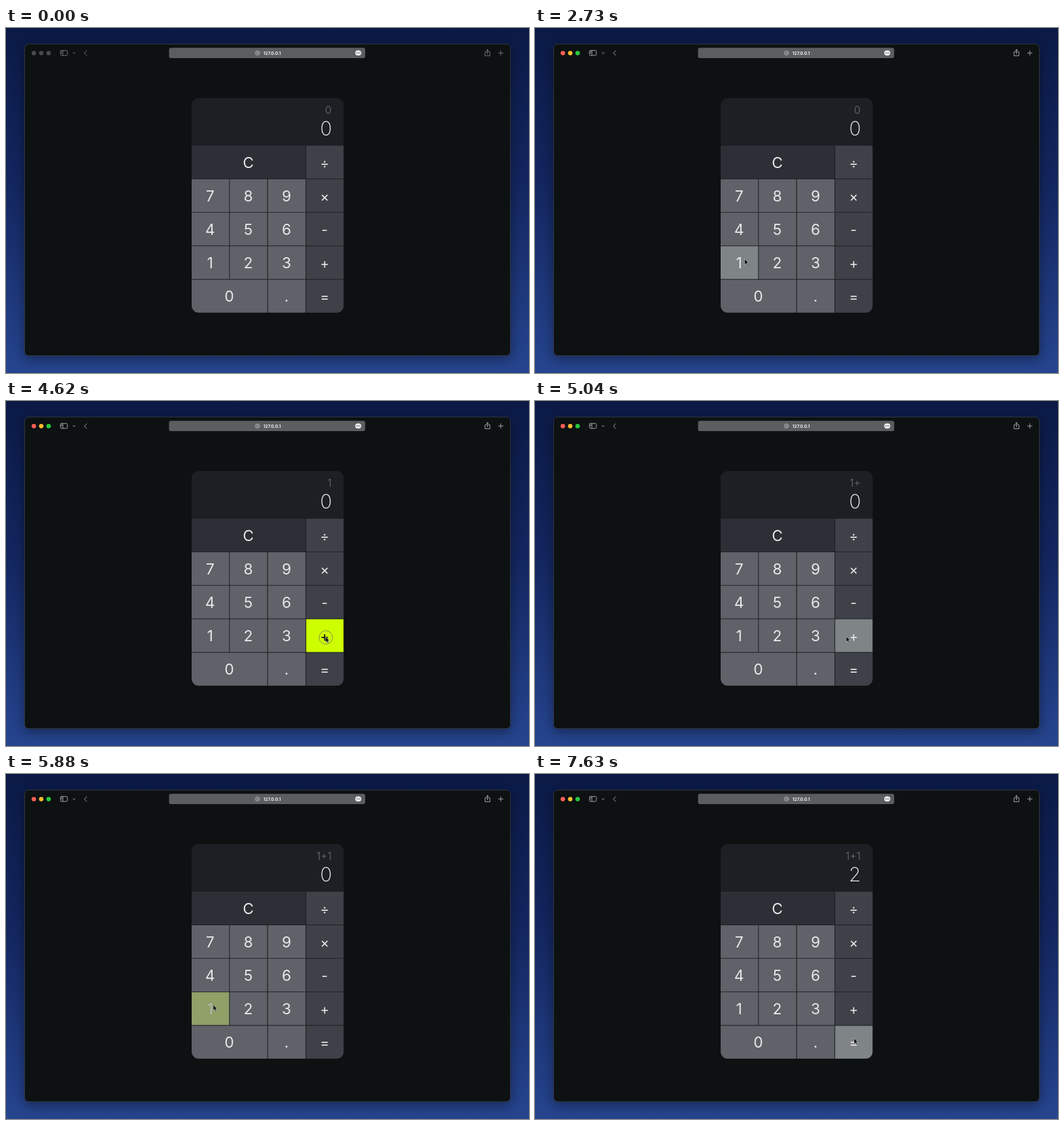
Write an HTML page that moves like this. It is 800x527 px and loops after 8 s.

```html
<!DOCTYPE html>
<html lang="en">
<head>
<meta charset="utf-8">
<title>Calculator</title>
<style>
  html, body { margin: 0; width: 100%; height: 100%; overflow: hidden; background: #10215a; }
  svg { display: block; width: 100vw; height: 100vh; }
  text { font-family: Inter, "Liberation Sans", sans-serif; }
  .key text { font-size: 23px; text-anchor: middle; }
  .key .op { font-size: 21px; }
  .icon { fill: none; stroke-width: 1; stroke-linecap: round; stroke-linejoin: round; }
</style>
</head>
<body>
<svg viewBox="0 0 800 527" preserveAspectRatio="none">
  <defs>
    <linearGradient id="sky" x2="0" y2="1">
      <stop offset="0" stop-color="#0b1a45"/>
      <stop offset=".45" stop-color="#13265f"/>
      <stop offset="1" stop-color="#26458f"/>
    </linearGradient>
    <filter id="blur" x="-10%" y="-10%" width="120%" height="120%">
      <feGaussianBlur stdDeviation="9"/>
    </filter>
    <clipPath id="body"><rect x="284" y="107" width="232.6" height="328" rx="11"/></clipPath>
  </defs>

  <rect width="800" height="527" fill="url(#sky)"/>
  <rect x="28" y="30" width="744" height="476" rx="8" opacity=".38" filter="url(#blur)"/>
  <rect x="28.5" y="24.5" width="743" height="476" rx="6" fill="#0d1112" stroke="#3b4044" stroke-width=".8"/>

  <g id="lights">
    <circle cx="42.6" cy="38.3" r="3.4"/>
    <circle cx="53.9" cy="38.3" r="3.4"/>
    <circle cx="65.2" cy="38.3" r="3.4"/>
  </g>
  <g id="tools" class="icon">
    <rect x="83.3" y="34.3" width="10.6" height="7.6" rx="1.4"/>
    <path d="M87 34.5V41.8M84.7 36.3h.9M84.7 38h.9"/>
    <path d="M102.6 37.7L104.2 39.2L105.8 37.7"/>
    <path d="M123.4 34.8L119.8 38.3L123.4 41.8"/>
    <path d="M735 36.4H732.8V42.4H740.2V36.4H738M736.5 39.5V33M734.6 34.7L736.5 32.9L738.4 34.7"/>
    <path d="M753.4 38.2H760.4M756.9 34.7V41.7"/>
  </g>
  <rect x="249.4" y="30.3" width="300" height="15.8" rx="3" fill="#5b5d5f"/>
  <g class="icon" stroke="#a8aaab" style="stroke-width:.6">
    <circle cx="384.6" cy="38.2" r="3.5"/>
    <ellipse cx="384.6" cy="38.2" rx="1.6" ry="3.5"/>
    <path d="M381.1 38.2H388.1M381.7 36.4H387.5M381.7 40H387.5"/>
  </g>
  <text x="407" y="40.8" font-size="6.7" font-weight="600" text-anchor="middle" fill="#fff">127.0.0.1</text>
  <rect x="534.2" y="34.2" width="9.2" height="7.8" rx="3.9" fill="#f2f2f2"/>
  <g fill="#55575a">
    <circle cx="536.6" cy="38.1" r=".8"/><circle cx="538.8" cy="38.1" r=".8"/><circle cx="541" cy="38.1" r=".8"/>
  </g>

  <g clip-path="url(#body)">
    <rect x="284" y="107" width="233" height="328" fill="#1d1f24"/>
    <g id="keys"></g>
  </g>
  <text id="sum" x="498" y="131.2" font-size="16" font-weight="300" text-anchor="end" fill="#6d6f73"></text>
  <text id="result" x="498.5" y="164" font-size="30" font-weight="200" text-anchor="end" fill="#f2f2f3"></text>

  <circle id="ring" r="10.3" fill="none" stroke="#70765f" stroke-width="1"/>
  <path id="arrow" d="M0 0V8.6L2 6.9L3.3 9.8L4.8 9.1L3.5 6.3H6.1Z"
    fill="#050505" stroke="#d8d8d8" stroke-width=".6" stroke-linejoin="round"/>
</svg>
<script>
const LOOP = 8000, STEP = 70, FADE = 260, HOLD = 150;
const COLS = [284, 342.3, 400.8, 459.2], ROWS = [179.8, 231, 282.1, 333.3, 384.6];
const LIGHT = [231, 232, 233], BLACK = [10, 10, 10];
const HOVER = [127, 132, 134], ACTIVE = [206, 255, 0];
const FILL = { digit: [95, 98, 104], op: [62, 65, 71], clear: [44, 47, 54] };
const $ = id => document.getElementById(id);
const clamp = v => Math.max(0, Math.min(1, v));
const mix = (a, b, k) => a.map((v, i) => v + (b[i] - v) * k);
const rgb = c => `rgb(${c.map(Math.round)})`;

function add(parent, tag, attrs, text = "") {
  const el = document.createElementNS("http://www.w3.org/2000/svg", tag);
  for (const k in attrs) el.setAttribute(k, attrs[k]);
  el.textContent = text;
  parent.append(el);
  return el;
}

// label, column, row, columns spanned
const keys = [
  ["C", 0, 0, 3], ["÷", 3, 0, 1],
  ["7", 0, 1, 1], ["8", 1, 1, 1], ["9", 2, 1, 1], ["×", 3, 1, 1],
  ["4", 0, 2, 1], ["5", 1, 2, 1], ["6", 2, 2, 1], ["-", 3, 2, 1],
  ["1", 0, 3, 1], ["2", 1, 3, 1], ["3", 2, 3, 1], ["+", 3, 3, 1],
  ["0", 0, 4, 2], [".", 2, 4, 1], ["=", 3, 4, 1]
].map(([label, col, row, span]) => {
  const x = COLS[col], y = ROWS[row], w = span * 58.4 - 1.1, h = 50.2;
  const kind = label === "C" ? "clear" : col === 3 ? "op" : "digit";
  const g = add($("keys"), "g", { class: "key" });
  const rect = add(g, "rect", { x, y, width: w, height: h });
  const text = add(g, "text", { x: x + w / 2 - .4, y: y + 33.7, class: kind }, label);
  return { label, x, y, w, h, kind, rect, text };
});

const presses = [
  { at: 2800, key: "1", sum: "1", result: "0" },
  { at: 4620, key: "+", sum: "1+", result: "0" },
  { at: 5530, key: "1", sum: "1+1", result: "0" },
  { at: 6580, key: "=", sum: "1+1", result: "2" }
];

// time, x, y of the pointer tip
const path = [
  [2030, 425, 524], [2590, 320.5, 352.8], [3895, 320.5, 352.8],
  [3920, 393.3, 360.3], [4340, 488.7, 360], [4970, 488.7, 360],
  [5390, 317, 352.6], [5880, 317, 352.6], [6300, 488.3, 404], [7070, 488, 403.6]
];

function pointer(t) {
  if (t < path[0][0]) return null;
  const i = path.findIndex(p => p[0] > t);
  if (i < 0) return path.at(-1).slice(1);
  const a = path[i - 1], b = path[i], k = clamp((t - a[0]) / (b[0] - a[0]));
  const ease = a[0] === 3920 ? 1 - (1 - k) ** 2 : k * k * (3 - 2 * k);
  return mix(a.slice(1), b.slice(1), ease);
}

function inside(key, p) {
  return p && p[0] >= key.x && p[0] < key.x + key.w && p[1] >= key.y && p[1] < key.y + key.h;
}

function draw(t) {
  const focused = t >= 70;
  ["#ff5f57", "#febc2e", "#28c840"].forEach((c, i) =>
    $("lights").children[i].setAttribute("fill", focused ? c : "#47494b"));
  $("tools").setAttribute("stroke", focused ? "#a3a5a6" : "#737576");

  // A sliding average of the pointer's presence gives each key a linear fade.
  const trail = Array.from({ length: 26 }, (_, i) => pointer(t - i * FADE / 26));
  for (const key of keys) {
    const level = trail.filter(p => inside(key, p)).length / trail.length;
    let fill = mix(FILL[key.kind], HOVER, level), ink = LIGHT;
    for (const p of presses) {
      if (p.key !== key.label || t < p.at) continue;
      const glow = 1 - clamp((t - p.at - HOLD) / FADE);
      fill = mix(fill, ACTIVE, glow);
      ink = mix(ink, BLACK, glow);
    }
    key.rect.setAttribute("fill", rgb(fill));
    key.text.setAttribute("fill", rgb(ink));
  }

  const last = presses.filter(p => t >= p.at).at(-1);
  const done = presses.filter(p => t >= p.at + HOLD).at(-1);
  $("sum").textContent = done ? done.sum : "0";
  $("result").textContent = done ? done.result : "0";

  const tip = pointer(t);
  $("arrow").setAttribute("visibility", tip ? "visible" : "hidden");
  $("ring").setAttribute("opacity", last ? .8 * clamp(1 - (t - last.at) / 210) : 0);
  if (tip) {
    $("arrow").setAttribute("transform", `translate(${tip})`);
    $("ring").setAttribute("transform", `translate(${tip[0] + .5} ${tip[1] + 1.2})`);
  }
}

const start = performance.now();
function tick() {
  const t = (performance.now() - start) % LOOP;
  draw(Math.floor(t / STEP) * STEP);
  requestAnimationFrame(tick);
}
tick();
</script>
</body>
</html>
```
